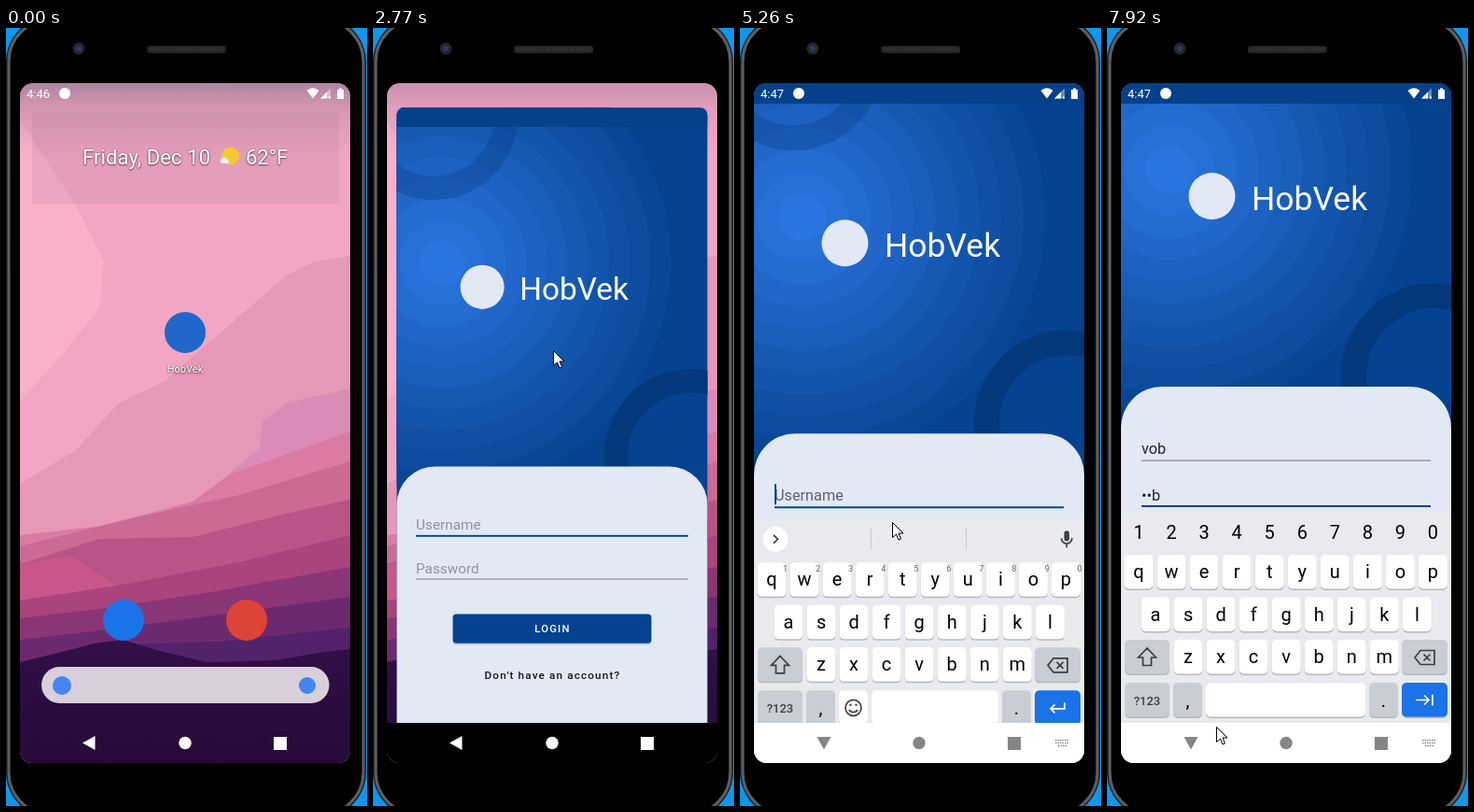
These frames come from a looping animation (387x833 px, 8 s). An HTML page:

```html
<!DOCTYPE html>
<html lang="en">
<head>
<meta charset="utf-8">
<title>Phone login</title>
<style>
html, body { margin: 0; width: 100%; height: 100%; overflow: hidden; background: #000 }
svg { display: block; width: 387px; height: 833px; font-family: Roboto, sans-serif }
.mid { text-anchor: middle }
.glow { fill: #fff; text-shadow: 0 0 2px #0006, 0 1px 2px #0008 }
.field { font-size: 16.3px }
.small { font-size: 9px; fill: #666 }
.line { fill: none; stroke: #3c4043; stroke-width: 1.7 }
</style>
</head>
<body>
<svg viewBox="0 0 387 833">
  <defs>
    <clipPath id="screenClip"><rect x="15" y="59" width="354" height="728" rx="14"/></clipPath>
    <clipPath id="cardClip"><rect id="cardRect" x="15" y="59" width="354"/></clipPath>
    <linearGradient id="shadeFill" x2="0" y2="1">
      <stop stop-color="#4a5468" stop-opacity=".42"/><stop offset=".35" stop-color="#6a5c7c" stop-opacity=".2"/>
      <stop offset="1" stop-color="#6a5c7c" stop-opacity="0"/>
    </linearGradient>
    <linearGradient id="night" x2="0" y2="1"><stop stop-color="#320f49"/><stop offset="1" stop-color="#260a38"/></linearGradient>
  </defs>

  <!-- phone body -->
  <rect width="387" height="833" fill="#0c98ee"/>
  <rect y="-12" width="386" height="857" rx="48" fill="#1c1d1e"/>
  <rect x="3" y="-9" width="380" height="851" rx="45" stroke="#5c5f62" stroke-width="3"/>
  <circle cx="78" cy="22" r="6.5" fill="#25252c"/><circle cx="78" cy="22" r="3" fill="#30376a"/>
  <rect x="151" y="19" width="85" height="8" rx="3" fill="#242424"/>
  <path d="M154 23H233" stroke="#343434" stroke-width="4" stroke-dasharray="1 1"/>

  <g clip-path="url(#screenClip)">
    <g id="home">
      <rect x="15" y="59" width="354" height="728" fill="#f3a6c3"/>
      <g id="hills"></g>
      <rect id="shade" x="15" y="59" width="354" height="80" fill="url(#shadeFill)"/>
      <rect id="widget" x="28" y="90" width="329" height="98" fill="#95738f" opacity=".16"/>
      <g id="date" class="glow" font-size="22">
        <text x="82" y="146" letter-spacing=".1">Friday, Dec 10</text><text x="257" y="146">62°F</text>
        <circle cx="240.500" cy="137" r="9.500" fill="#f4c92f"/>
        <path d="M231 145a3 3 0 0 1 0-5a4 4 0 0 1 7 1a2.500 2.500 0 0 1 0 4z" fill="#eee"/>
      </g>
      <g id="apps">
        <circle id="appIcon" cx="192" cy="326" r="22" fill="#2067c9"/>
        <text class="mid glow" x="192" y="369" font-size="11">HobVek</text>
        <circle cx="126" cy="634" r="22" fill="#1a73e8"/>
        <circle cx="258" cy="634" r="22" fill="#db4437"/>
      </g>
      <g id="search">
        <rect x="38" y="684" width="308.500" height="39" rx="19.500" fill="#d8cfda"/>
        <circle cx="60" cy="704" r="10" fill="#4285f4"/><circle cx="323" cy="704" r="9" fill="#4285f4"/>
      </g>
    </g>

    <g id="login">
      <g clip-path="url(#cardClip)">
        <rect x="15" y="59" width="354" height="728" fill="#05428f"/>
        <g id="page">
          <g id="rings"></g>
          <circle cx="57" cy="68" r="82.500" fill="none" stroke="#04377f" stroke-opacity=".3" stroke-width="27"/>
          <circle cx="351" cy="456" r="86.500" fill="none" stroke="#03387a" stroke-width="27"/>
          <circle cx="112.500" cy="263" r="25" fill="#e2e8f4"/>
          <text x="155" y="277.500" font-size="35.500" fill="#fff">HobVek</text>
          <rect x="15" y="467" width="354" height="500" rx="44" fill="#e2e8f4"/>
          <text id="userText" class="field" x="37" y="539"></text>
          <rect id="userLine" x="37" width="310"/>
          <text id="passText" class="field" x="37" y="589"></text>
          <rect id="passLine" x="37" width="310"/>
          <rect id="caret" width="2" height="22" fill="#05428f"/>
          <rect x="79" y="637" width="226" height="33" rx="4" fill="#0002"/>
          <rect x="79" y="635" width="226" height="33" rx="4" fill="#05428f"/>
          <g class="mid" font-weight="500">
            <text x="192.500" y="656" font-size="12" letter-spacing="1.300" fill="#fff">LOGIN</text>
            <text x="192.500" y="709" font-size="12.500" letter-spacing="1.200" fill="#14171d">Don't have an account?</text>
          </g>
        </g>
        <rect x="15" y="59" width="354" height="22" fill="#05408b"/>
      </g>
    </g>

    <g id="keyboard">
      <rect x="15" y="518" width="354" height="270" fill="#e8eaed"/>
      <g id="keys"></g>
      <g id="wordRow">
        <circle cx="38" cy="539" r="13.500" fill="#fff"/><path class="line" d="M36 534.500l4.500 4.500l-4.500 4.500"/>
        <g id="words" class="mid" font-size="16" fill="#505458">
          <text x="94" y="545">vo</text><text x="191" y="545">vob</text><text x="288" y="545">vote</text>
        </g>
        <path d="M140.500 528V550M242.500 528V550" stroke="#c8cacd"/>
        <rect x="347.500" y="530" width="5.500" height="11" rx="2.700" fill="#3c4043"/>
        <path class="line" d="M344.500 538a5.700 5.700 0 0 0 11.400 0M350.200 544V548"/>
        <g class="line">
          <circle cx="121.500" cy="719.500" r="8.500"/><path d="M117 721.500a5 5 0 0 0 9 0"/>
          <path d="M118.500 715.500v2M124.500 715.500v2" stroke-width="2.200"/>
        </g>
        <path d="M348 714v6.500h-15m4.500-4.500l-4.500 4.500l4.500 4.500" class="line" style="stroke:#fff"/>
      </g>
      <g id="digitRow"><path d="M331 719.500h14m-5-5l5 5l-5 5M349 713.500v12" class="line" style="stroke:#fff"/></g>
      <path class="line" d="M43 664l-9.500 10h5v8.500h9V674h5zM330 674l6-7.500h15v15h-15zM339.500 670.500l7 7m0-7l-7 7"/>
      <text class="mid" x="43" y="725" font-size="13" font-weight="500" fill="#3c4043">?123</text>
    </g>

    <rect id="navBar" x="15" y="744" width="354" height="43"/>
    <g id="nav">
      <path id="back" d="M82 765.500L95.500 758V773Z"/><circle cx="192" cy="765.500" r="6.700"/><rect x="287" y="759" width="14" height="14"/>
      <path id="switcher" d="M338 762.500H353M338 765.500H353M341 768.500H350" stroke="#858585" stroke-width="1.500" stroke-dasharray="1.500 1"/>
    </g>
    <g id="status" fill="#fff">
      <text id="clock" x="22" y="75" font-size="13"></text>
      <circle cx="63" cy="70" r="6"/>
      <path d="M322.500 67Q329 61.500 335.500 67L329 75.500Z"/>
      <path d="M337 75.500H348V64.500Z" opacity=".4"/><path d="M337 75.500H344V68.500ZM346 75.500h2v-2h-2z"/>
      <path d="M355 66h2v-1.500h3V66h2V76h-7z"/>
    </g>
  </g>
  <path id="cursor" d="M0 0V16L4 12.500L6.500 18.500L9 17.500L6.500 11.500H11.500Z" fill="#fff" stroke="#000"/>
</svg>
<script>
const ui = {};
document.querySelectorAll('[id]').forEach(el => ui[el.id] = el);
const LOOP = 8000, BLUE = '#05428f', START = performance.now();

// Wallpaper layers: colour and upper edge; each is filled down to the bottom
const hills = [
  ['#e797b8', '15 488 75 452 120 402 170 378 235 322 300 265 330 250 369 244'],
  ['#dc8ab6', '15 560 200 510 272 450 275 422 300 402 369 386'],
  ['#da7ba3', '15 543 105 533 200 507 240 478 369 432'],
  ['#cb6a95', '15 555 130 526 250 500 369 464'],
  ['#b85586', '15 574 100 547 200 545 300 520 369 505'],
  ['#a9447d', '15 612 120 597 250 572 369 543'],
  ['#8a3576', '15 632 100 622 220 604 369 577'],
  ['#6b2a70', '15 655 100 645 200 632 369 609'],
  ['#52226a', '15 679 125 660 230 657 369 642'],
  ['url(#night)', '15 679 60 668 95 659 125 655 165 667 215 679 290 677 335 669 369 665']
];
ui.hills.innerHTML = '<path fill="#fbb0ca" d="M15 100L75 190L105 250L100 300L60 350L15 400Z"/>' +
  hills.map(([fill, edge]) => `<path fill="${fill}" d="M${edge}V787H15Z"/>`).join('') +
  '<path fill="#c8568a" d="M15 575L70 565L118 597L15 613Z"/>';

const mix = (a, b, u) => `rgb(${a.map((v, i) => Math.round(v + (b[i] - v) * u))})`;
for (let i = 1; i <= 11; i++)
  ui.rings.innerHTML += `<circle cx="67" cy="235" r="${284 - 23.5 * i}" fill="${mix([5, 66, 143], [42, 117, 223], i / 11)}"/>`;

const label = (x, y, text, attrs = 'class="mid" font-size="20"') => `<text x="${x}" y="${y}" ${attrs}>${text}</text>`;
const key = (x, y, w, fill = '#fff') =>
  `<rect x="${x}" y="${y + 1}" width="${w}" height="37" rx="5" fill="#b4b7bc"/>
   <rect x="${x}" y="${y}" width="${w}" height="36.500" rx="5" fill="${fill}"/>`;
const GREY = '#c9cdd4';
let keys = key(19, 655, 48, GREY) + key(316, 655, 49, GREY) + key(19, 701, 48, GREY) + key(71, 701, 31, GREY) +
  key(281, 701, 31, GREY) + key(316, 701, 49, '#1a73e8') + label(86.5, 727, ',') + label(296.5, 727, '.');
['qwertyuiop', 'asdfghjkl', 'zxcvbnm'].forEach((row, r) => [...row].forEach((ch, i) => {
  const x = [34, 52, 87][r] + 35.05 * i, y = 564 + 45.5 * r;
  keys += key(x - 15.5, y, 31) + label(x, y + 25, ch);
}));
ui.keys.innerHTML = keys;
let hints = '', digits = '';
[...'1234567890'].forEach((d, i) => {
  hints += label(46 + 35.05 * i, 574, d, 'class="small"');
  digits += label(34 + 35.05 * i, 547, d);
});
ui.wordRow.innerHTML = key(106, 701, 31) + key(141, 701, 136) + hints + ui.wordRow.innerHTML;
ui.digitRow.innerHTML = key(106, 701, 171) + digits + ui.digitRow.innerHTML;
ui.words = document.getElementById('words');

// Each row: start time, then the values held from then on
const pointer = [
  [960, 306, 347], [1110, 272, 352], [1230, 233, 355], [1380, 215, 352], [1500, 199, 349], [1650, 195, 345],
  [1800, 193, 345], [3690, 179, 384], [3840, 178, 450], [3960, 177, 514], [4110, 163, 528], [4260, 163, 529],
  [7520, 158, 575], [7650, 143, 635], [7790, 130, 700], [7920, 117, 748]
];
const caretOn = [[0, 0], [3690, 1], [4110, 0], [4560, 1], [6540, 0], [6690, 1], [7520, 0]];
const userTyped = [[0, ''], [5500, 'v'], [5620, 'vo'], [5900, 'vob']];
const passTyped = [[0, ''], [6690, 'v'], [6840, '•o'], [6960, '••b']];
const ticks = [[0], [2630], [2770], [2890], [3010], [3310], [3690], [3840], [3960], [4110], [5140], [5260], [5380], [6020], [6140]];

const held = (rows, t) => rows.findLast(row => row[0] <= t);
const clamp = u => Math.min(1, Math.max(0, u));
const easeOut = u => 1 - (1 - clamp(u)) ** 3;
const lerp = (a, b, u) => a + (b - a) * u;
const show = (el, on) => el.style.display = on ? '' : 'none';
const set = (el, attrs) => Object.entries(attrs).forEach(([k, v]) => el.setAttribute(k, v));

function drawField(text, line, y, typed, hint, hintColor, focused) {
  text.textContent = typed || hint;
  set(text, { fill: typed ? '#22252b' : hintColor });
  set(line, { y: focused ? y - 1 : y - .5, height: focused ? 2 : 1.2, fill: focused ? BLUE : '#82868f' });
}

function draw(t) {
  const step = held(ticks, t)[0];
  const opened = t >= 2630, typing = t >= 5140, onPass = t >= 6020;

  // Home screen
  show(ui.widget, t < 2370);
  show(ui.apps, !opened);
  set(ui.shade, { opacity: opened ? .6 : 1 });
  set(ui.appIcon, { opacity: t >= 2370 ? .85 : 1 });
  set(ui.date, { transform: `translate(0 ${opened ? -14 : 0})`, opacity: opened ? .55 : 1 });
  set(ui.search, { transform: `translate(0 ${opened ? -14 : 0})`, opacity: opened ? .5 : 1 });

  // Login card grows to fill the screen
  const grow = easeOut((step - 2630) / 380), scale = lerp(.768, 1, grow);
  show(ui.login, opened);
  set(ui.login, { transform: `translate(${lerp(56, 15, grow) - 15 * scale} ${lerp(163.3, 59, grow) - 59 * scale}) scale(${scale})` });
  set(ui.cardRect, { height: lerp(654.5, 728, grow), rx: lerp(34, 0, grow) });

  // Keyboard slides in and pushes the page up
  const slide = easeOut((step - 5020) / 360);
  show(ui.keyboard, typing);
  set(ui.keyboard, { transform: `translate(0 ${226 * (1 - slide)})` });
  set(ui.page, { transform: `translate(0 ${-34 * slide - 49 * easeOut((step - 5900) / 240)})` });
  show(ui.wordRow, !onPass);
  show(ui.digitRow, onPass);
  show(ui.words, t >= 5620);

  const user = held(userTyped, t)[1], pass = held(passTyped, t)[1];
  drawField(ui.userText, ui.userLine, 546, user, 'Username', t >= 4860 ? '#5c616d' : '#8e939f', !onPass);
  drawField(ui.passText, ui.passLine, 595, pass, 'Password', '#8e939f', onPass);
  ui.userText.style.textDecoration = user && !onPass ? 'underline' : '';
  const active = onPass ? ui.passText : ui.userText, filled = onPass ? pass : user;
  show(ui.caret, held(caretOn, t)[1]);
  set(ui.caret, { x: 37 + (filled ? active.getComputedTextLength() : 0), y: onPass ? 570 : 521 });

  // System bars
  const grey = Math.round(lerp(255, 153, clamp((step - 3010) / 1100)));
  show(ui.navBar, t >= 2770);
  set(ui.navBar, { fill: typing ? '#fff' : '#000' });
  show(ui.nav, !opened || t >= 2770);
  set(ui.nav, { fill: typing ? '#858585' : `rgb(${grey},${grey},${grey})` });
  set(ui.back, { transform: typing ? 'rotate(-90 89.5 765)' : '' });
  show(ui.switcher, typing);
  show(ui.status, !opened || t >= 2890);
  ui.clock.textContent = t >= 3310 ? '4:47' : '4:46';

  const spot = held(pointer, t);
  show(ui.cursor, spot);
  if (spot) set(ui.cursor, { transform: `translate(${spot[1] + .5} ${spot[2] + .5})` });
}

function frame() {
  draw((performance.now() - START) % LOOP);
  requestAnimationFrame(frame);
}
frame();
</script>
</body>
</html>
```
